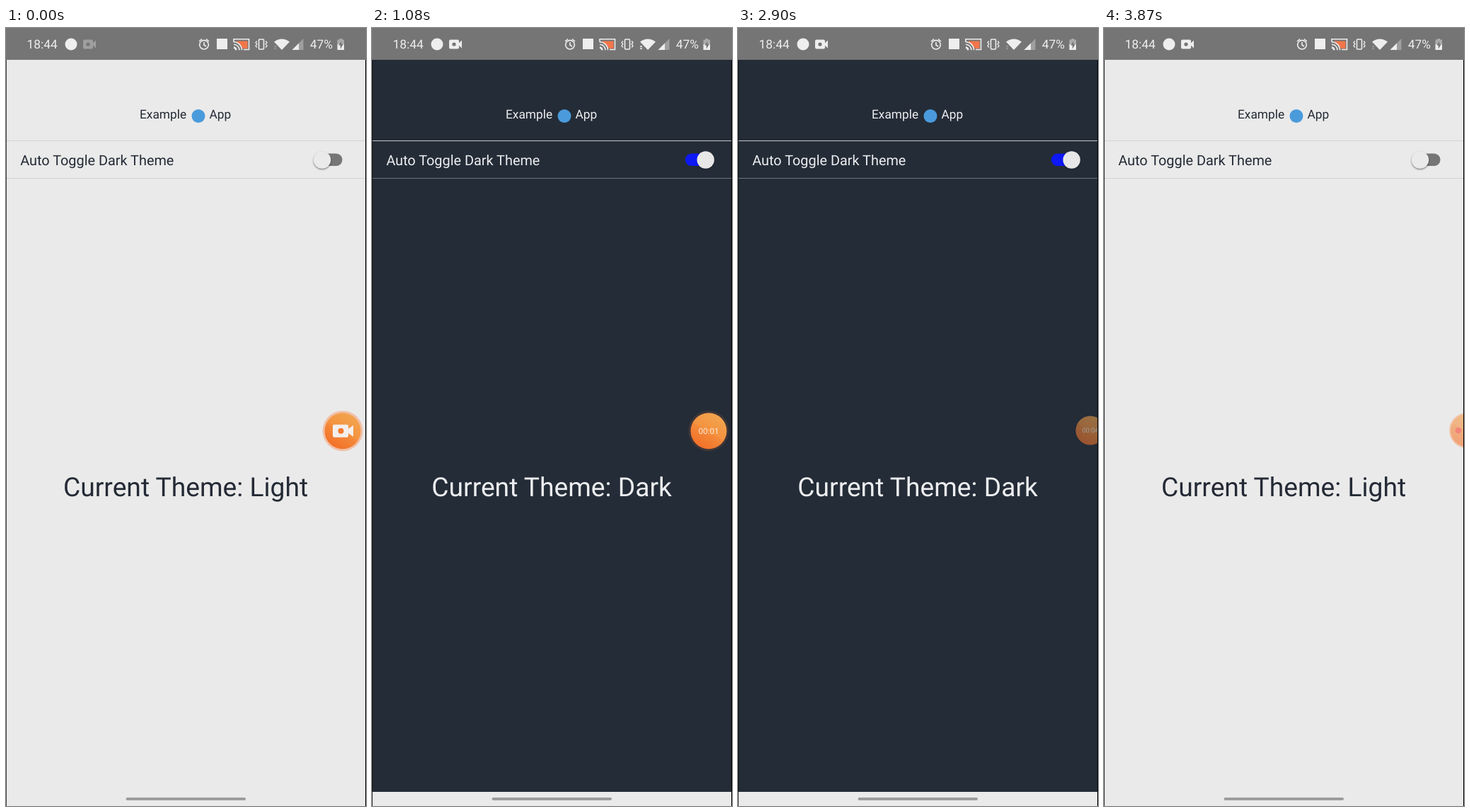
An HTML page for the animation above (4890 ms loop, 509 by 1100 pixels).

```html
<!DOCTYPE html>
<html lang="en">
<head>
<meta charset="utf-8">
<title>Theme toggle</title>
<style>
  html, body { margin: 0; width: 100%; height: 100%; overflow: hidden; background: #eaeaea; }
  svg { display: block; width: 100%; height: 100%; font-family: Roboto, sans-serif; text-rendering: geometricPrecision; }
  #app { --bg: #eaeaea; --ink: #242a35; --line: #d2d3d4; --line2: #d2d3d4; --thumb: #eaeaea; --shadow: .45; --halo: #d3d8db; }
  #app.dark { --bg: #242c37; --ink: #eceef0; --line: #c3c7cb; --line2: #6c737b; --thumb: #e7e7e7; --shadow: .2; --halo: #1d242e; }
  #app text { fill: var(--ink); }
  .status { fill: #eee; }
  .stroke { fill: none; stroke: #eee; stroke-width: 1.6; }
</style>
</head>
<body>
<svg viewBox="0 0 509 1100">
  <defs>
    <linearGradient id="orange" x1=".15" y1="1" x2=".75" y2="0">
      <stop offset="0" stop-color="#f26b25"/>
      <stop offset=".5" stop-color="#f38a3a"/>
      <stop offset=".51" stop-color="#f4923f"/>
      <stop offset="1" stop-color="#f2a650"/>
    </linearGradient>
    <filter id="soft" x="-50%" y="-50%" width="200%" height="200%">
      <feGaussianBlur stdDeviation="1.1"/>
    </filter>
  </defs>

  <rect width="509" height="1100" fill="#eaeaea"/>
  <g id="app">
    <rect y="45" width="509" height="1035" fill="var(--bg)"/>
    <text x="189" y="128" font-size="17.33">Example</text>
    <circle cx="272" cy="124.5" r="9.5" fill="#4a9bdc"/>
    <text x="287.5" y="128" font-size="17.33">App</text>
    <rect y="159" width="509" height="1" fill="var(--line)"/>
    <text x="20.2" y="194" font-size="19.87">Auto Toggle Dark Theme</text>
    <rect y="212" width="509" height="1" fill="var(--line2)"/>
    <circle id="halo" r="15" fill="var(--halo)"/>
    <rect id="track" x="443" y="177.5" width="32.5" height="17.5" rx="8.75"/>
    <g id="thumb">
      <circle cy="1.3" r="12.3" fill="#000" opacity="var(--shadow)" filter="url(#soft)"/>
      <circle r="12.2" fill="var(--thumb)"/>
    </g>
    <text id="label" x="254.1" y="662" font-size="37.2" text-anchor="middle"></text>
  </g>

  <rect width="509" height="45" fill="#757575"/>
  <g class="status">
    <text x="29.5" y="29.3" font-size="17.33">18:44</text>
    <circle cx="92" cy="23" r="8.5"/>
    <g id="camera">
      <path d="M111 16.5h10q2 0 2 2v2.7l4-3.6v10.8l-4-3.6v2.7q0 2-2 2h-10q-2 0-2-2v-9q0-2 2-2z"/>
      <circle cx="116" cy="23" r="2.6" fill="#757575"/>
    </g>
    <g class="stroke">
      <circle cx="280" cy="23.7" r="6.3"/>
      <path d="M280 20v4l3 2M273 19l4-3.5M287 19l-4-3.5"/>
    </g>
    <rect x="298" y="15" width="15" height="15"/>
    <path d="M326 18.5h15.500v10.500H335Q332 23 326 21z" fill="#f2764a"/>
    <g class="stroke">
      <path d="M322 20v-4.200h21.500v14.700H336M322 23.200a8 8 0 0 1 8 8M322 19.700a11.500 11.500 0 0 1 11.500 11.500"/>
      <path d="M322 27.500q3 .5 3.500 3.700" stroke-width="2.4"/>
      <rect x="357.500" y="16" width="7" height="14" rx="1"/>
      <path d="M354.800 18.500l-1.800 2 1.800 2.300-1.800 2.400 1.800 2.300M367.200 18.500l1.800 2-1.800 2.300 1.800 2.400-1.800 2.300" stroke-width="1.3"/>
    </g>
    <path d="M390 31L379 19.500Q390 11.500 401 19.500z"/>
    <path id="arrows" d="M378.500 27l2-2.400 2 2.400zM378.500 28.300l2 2.400 2-2.400z"/>
    <path d="M404.500 31L420.500 15v16z" opacity=".35"/>
    <path d="M404.500 31L414 21.500V31z"/>
    <text x="429.800" y="29.300" font-size="17.330">47%</text>
    <path d="M471.500 16.500V15h3.500v1.500h3V23h-9.500v-6.500z" opacity=".45"/>
    <path d="M468.500 23h9.500v8h-9.500z"/>
    <path d="M474.300 18.500l-4 6h2.500v5l4-6.500h-2.500z" fill="#757575"/>
  </g>

  <g id="bubble">
    <circle id="ring" r="28.500" fill="#ff7a3c"/>
    <circle r="25.500" fill="url(#orange)"/>
    <g id="film">
      <path d="M-12-9H6q2 0 2 2v4l7-5V8l-7-5v4q0 2-2 2h-18q-2 0-2-2v-14q0-2 2-2z" fill="#f4efec"/>
      <circle cx="-2.500" r="4" fill="#f27a2e"/>
    </g>
    <text id="timer" y="4.200" font-size="11.600" text-anchor="middle" fill="#fff" opacity=".82"></text>
  </g>
  <g id="edge" opacity=".66">
    <circle cx="513" cy="569" r="25" fill="#f6b48e"/>
    <circle cx="513" cy="569" r="23" fill="url(#orange)" opacity=".8"/>
    <circle cx="501" cy="569" r="4.300" fill="#f8503f"/>
  </g>

  <rect x="169.500" y="1088" width="169.500" height="4" rx="2" fill="#9d9d9d"/>
  <path d="M.5 45V1100" stroke="#000" opacity=".7"/>
  <path d="M508.500 45V1100" stroke="#000"/>
</svg>
<script>
  const LOOP = 4890;
  const RECORD = 160, DOCK = 1220, DOCK_TIME = 260, TUCK = 3870;
  const THUMB_TIME = 220, HALO_TIME = 80;
  const turnOn = { track: 240, thumb: 270, theme: 320 };
  const turnOff = { track: 3430, thumb: 3482, theme: 3510 };
  const seconds = [[0, 0], [840, 1], [1840, 2], [2540, 3], [2820, 4], [3510, 5]];

  const $ = id => document.getElementById(id);
  const set = (id, attrs) => {
    for (const [name, value] of Object.entries(attrs)) $(id).setAttribute(name, value);
  };
  const ease = x => (1 - Math.cos(Math.PI * Math.max(0, Math.min(1, x)))) / 2;
  const mix = (a, b, p) => a + (b - a) * p;
  const within = (t, a, b) => t >= a && t < b;

  function drawSwitch(t) {
    const isOn = part => within(t, turnOn[part], turnOff[part]);
    const dark = isOn('theme');
    const slide = ease((t - turnOn.thumb) / THUMB_TIME) - ease((t - turnOff.thumb) / THUMB_TIME);
    const x = mix(447, 471.7, slide);
    const fresh = [turnOn, turnOff].some(({ theme }) => within(t, theme, theme + HALO_TIME));
    $('app').classList.toggle('dark', dark);
    $('label').textContent = 'Current Theme: ' + (dark ? 'Dark' : 'Light');
    set('track', { fill: isOn('track') ? '#0d18f5' : dark ? '#7b7b7b' : '#767676' });
    set('thumb', { transform: `translate(${x} 186.5)` });
    set('halo', { cx: x, cy: dark ? 188.5 : 184.5, opacity: fresh ? 1 : 0 });
  }

  function drawRecorder(t) {
    const recording = t >= RECORD;
    const dock = ease((t - DOCK) / DOCK_TIME);
    const second = seconds.filter(([at]) => at <= t).pop()[1];
    set('camera', { opacity: recording ? 1 : .35 });
    set('bubble', {
      transform: `translate(${mix(476, 498, dock)} ${mix(569.7, 569, dock)}) scale(${mix(1, .805, dock)})`,
      opacity: t >= TUCK ? 0 : mix(1, .57, dock)
    });
    set('ring', { opacity: recording ? mix(.13, 0, dock) : .38 });
    set('film', { opacity: recording ? 0 : 1 });
    $('timer').textContent = recording ? '00:0' + second : '';
    set('edge', { visibility: t >= TUCK ? 'visible' : 'hidden' });
    set('arrows', { opacity: within(t, 1080, 2860) ? 1 : .3 });
  }

  const start = performance.now();
  function frame() {
    const t = (performance.now() - start) % LOOP;
    drawSwitch(t);
    drawRecorder(t);
    requestAnimationFrame(frame);
  }
  frame();
</script>
</body>
</html>
```
